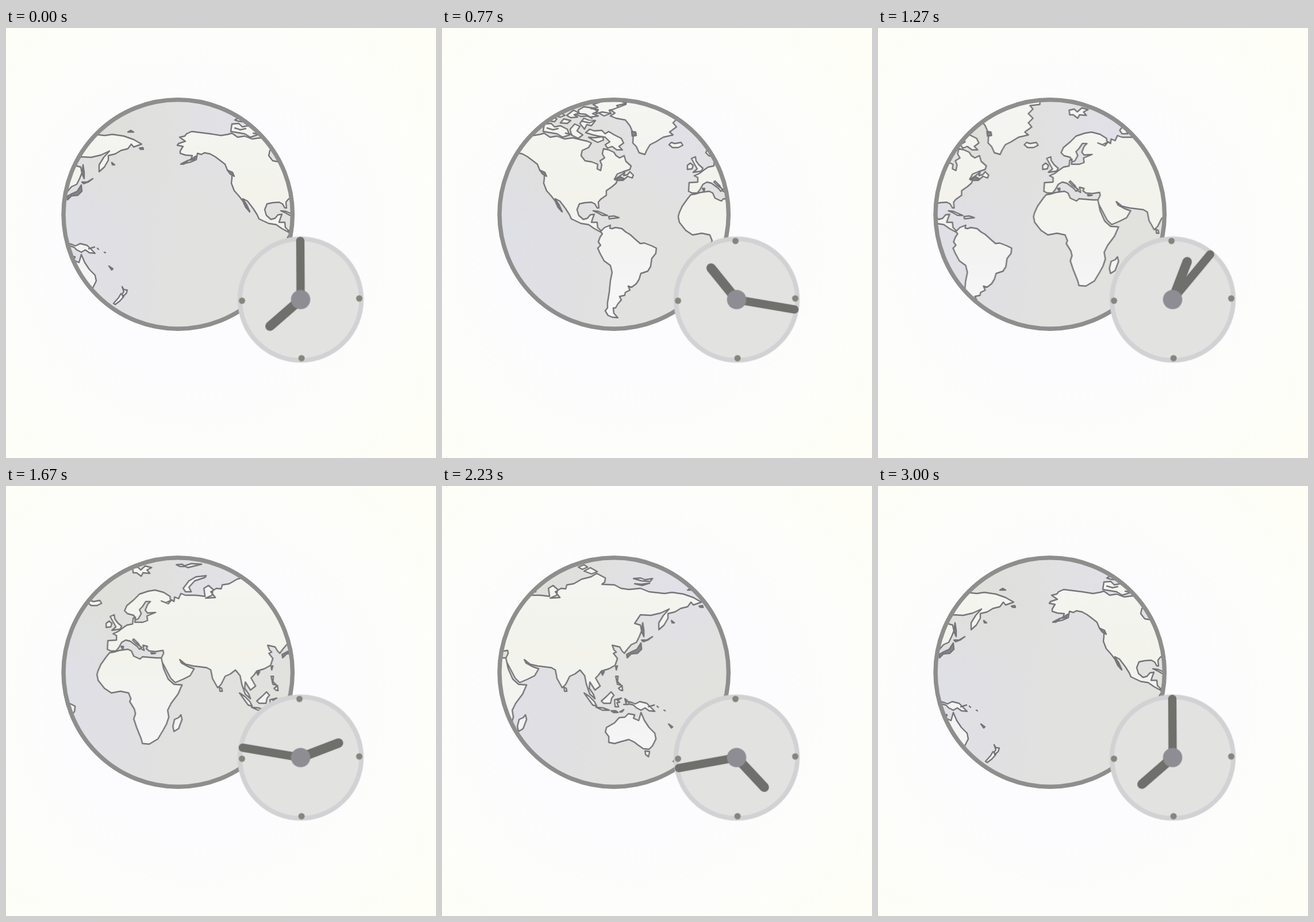
These frames come from a looping animation (748 by 748 pixels, 3.03 s). An HTML page without scripts:

```html
<!DOCTYPE html>
<html lang="en">
<head>
<meta charset="utf-8">
<title>World clock</title>
<style>
html, body { margin: 0; width: 100%; height: 100%; overflow: hidden; background: #fdfdfd; }
svg { display: block; width: 100vw; height: 100vh; }
.coast { fill: url(#land); stroke: #757579; stroke-width: 2.4; stroke-linejoin: round; stroke-linecap: round; }
.seam { stroke: #f3f3ed; stroke-width: 4; }
.dark { fill: #858588; }
.spin { animation: 3030ms steps(90, end) -4ms infinite; }
#world { animation-name: drift; }
#hour { animation-name: hour; }
#minute { animation-name: minute; }
.hand { stroke: #6f706b; stroke-linecap: round; }
@keyframes drift {
  0% { transform: translateX(0); }
  99.0099%, 100% { transform: translateX(-842px); }
}
@keyframes hour {
  0% { transform: rotate(-131deg); }
  99.0099%, 100% { transform: rotate(229deg); }
}
@keyframes minute {
  0% { transform: rotate(-.3deg); }
  99.0099%, 100% { transform: rotate(1799.7deg); }
}
</style>
</head>
<body>
<svg viewBox="0 0 748 748">
<defs>
  <radialGradient id="paper" cx=".45" cy=".5" r=".68">
    <stop offset=".45" stop-color="#fcfcfe"/>
    <stop offset="1" stop-color="#fefef7"/>
  </radialGradient>
  <linearGradient id="sea" x1="0" y1=".55" x2="1" y2=".65">
    <stop offset=".05" stop-color="#dfdfe6"/>
    <stop offset=".5" stop-color="#e1e1e0"/>
    <stop offset="1" stop-color="#e1e2dd"/>
  </linearGradient>
  <radialGradient id="cool" cx=".8" cy=".12" r=".42">
    <stop offset="0" stop-color="#e1e0e8"/>
    <stop offset="1" stop-color="#e1e0e8" stop-opacity="0"/>
  </radialGradient>
  <radialGradient id="warm" cx=".2" cy=".15" r=".4">
    <stop offset="0" stop-color="#dfe0da"/>
    <stop offset="1" stop-color="#dfe0da" stop-opacity="0"/>
  </radialGradient>
  <linearGradient id="land" gradientUnits="userSpaceOnUse" x1="0" y1="130" x2="0" y2="460">
    <stop offset="0" stop-color="#f5f5f2"/>
    <stop offset=".5" stop-color="#f3f3ec"/>
    <stop offset=".8" stop-color="#f3f3f3"/>
    <stop offset="1" stop-color="#f6f6f6"/>
  </linearGradient>
  <clipPath id="disc"><circle cx="299.2" cy="324" r="199"/></clipPath>

  <g id="map" class="coast">
    <!-- North America -->
    <path class="seam" d="M393 262L515 263"/>
    <path d="M393 262L393 254 385 247 381 237 372 230 364 224 355 219 345 217 340 220 333 218 331 229 322 233 304 237 322 228 324 222 312 221 303 218 303 214 308 206 298 204 300 201 312 197 302 190 311 188 314 184 323 180 355 184 374 187 386 185 393 183 403 190 415 188 428 193 443 191 455 194 468 197 475 200 470 208 459 213 457 222 464 231 476 233 486 237 485 245 491 248 493 238 490 231 498 226 494 219 496 210 505 212 514 216 518 222 524 226 532 222 535 232 544 240 542 246 530 250 520 254 515 263"/>
    <path d="M515 263L524 258 533 251 531 257 538 255 542 250 548 256 546 261 538 258 530 265 520 265 518 270 511 276 501 283 501 291 491 298 487 303 488 313 485 313 481 306 475 303 463 304 454 306 450 316 453 326 461 333 468 331 473 325 480 324 477 332 475 338 485 338 486 347 491 352 493 356 480 349 470 342 457 340 440 332 437 325 430 314 420 301 412 297 418 308 424 320 417 312 412 301 405 292 397 283 392 270 393 262"/>
    <path class="dark" d="M385 247l9 4 3 7-7-4zM413 299l6 9 5 11-7-8zM320 230l10-7-2 6zM305 236l12-6-8 7zM516 264l10-5 6 3-8 3z"/>
    <path d="M478 318l9 1 9 4 7 3-9 0-7-4zM505 328l9-1 9 3-9 1-8 1z"/>
    <!-- South America -->
    <path d="M491 354L498 347 508 343 507 348 511 349 517 347 528 349 535 355 542 359 553 369 560 375 567 374 580 379 588 383 587 392 580 401 578 415 573 423 561 427 558 437 553 445 545 451 539 449 542 456 534 460 533 465 524 467 527 473 521 480 517 487 513 487 514 496 521 504 511 503 504 500 499 492 503 487 503 478 506 460 508 440 511 425 508 413 497 405 490 392 486 383 491 378 487 372 490 364 494 358z"/>
    <!-- Arctic islands -->
    <path d="M391 180L393 167 405 166 411 172 421 170 433 176 437 186 425 190 415 184 403 182z"/>
    <path d="M465 182L472 176 480 179 493 178 499 184 505 180 515 186 527 192 531 200 523 206 529 212 519 212 511 206 503 209 499 203 507 198 499 190 487 188 478 186z"/>
    <path d="M398 160l9-5 8 3-4 5-7-1zM412 153l10-5 7 4-8 3zM421 165l6-7 12 3-6 5zM432 152l12-9 10 5-9 3 6 4-12 1zM438 176l8-9 9 4-5 8 10 7-8 6-12-6zM455 166l7-9 10 4 10 0-7 9-8-2-4 8zM470 190l10 1 15-2 1 6-10 4-8-4z"/>
    <path d="M452 143l10-6 14 2 10 6-9 4 10 4-14 2-8-5-11-1zM478 133l17-6 30 0 11 4-17 4 5 5-18 3 3 6-15-3-11 3 4-7-13-2 12-2z"/>
    <path d="M398 174l10 3 9-2M447 150l10 4 11-1 8 4M430 183l11 2M458 162l14 3 9-4M488 148l9 5 10-4"/>
    <!-- Greenland, Iceland -->
    <path d="M540 112L638 112 637 133 620 135 625 141 617 149 625 157 617 165 623 172 611 181 617 186 600 190 587 198 577 203 571 213 568 220 558 217 553 206 547 200 548 184 542 170 534 160 518 157 508 153 516 148 509 143 535 133z"/>
    <path d="M610 203l4-4 6 2 11-2 3 5-8 4-10 0z"/>
    <path class="dark" d="M545 180l7 1 1 6-7 1z"/>
    <!-- Europe and Asia -->
    <path class="seam" d="M798 190L965 272 738 299z"/>
    <path d="M738 299L742 291 741 286 728 288 717 287 712 283 714 279 706 277 708 286 704 284 698 274 690 266 688 268 693 273 704 281 700 284 696 279 684 270 676 268 669 272 664 281 659 287 650 287 644 284 645 269 660 268 660 260 654 257 663 253 668 249 678 242 688 240 689 230 693 228 692 237 706 237 714 234 713 226 728 220 714 221 710 216 714 206 719 201 711 201 705 210 700 215 703 222 698 231 693 233 690 225 679 222 674 217 678 208 690 198 700 188 715 183 727 181 742 185 753 192 754 199 746 203 738 200 750 205 756 198 760 201 761 193 768 196 772 187 780 190 798 190"/>
    <path d="M798 190L814 192 812 178 820 173 828 180 826 190 815 195 832 194 824 184 834 178 842 179 844 172 856 170 870 162 886 158 896 152 911 160 910 167 905 171 927 172 938 178 952 180 972 178 987 184 1014 187 1027 185 1047 188 1064 194 1078 202 1064 207 1060 202 1054 210 1042 213 1032 219 1020 222 1020 230 1013 242 1004 250 1004 238 1012 225 1022 214 1007 221 990 225 972 224 962 239 972 242 974 252 970 262 965 272"/>
    <path d="M965 272L956 276 950 283 944 291 940 287 936 280 923 277 926 285 930 289 925 291 932 300 928 312 917 318 904 322 899 329 894 334 902 348 893 355 884 341 883 352 890 362 893 370 884 362 878 345 875 330 867 320 858 327 849 331 842 345 836 351 827 335 824 320 817 316 793 313 780 310 770 302 773 308 784 314 795 318 788 330 776 336 762 342 754 334 744 315 736 300 738 299"/>
    <path d="M649 227l7-3 1 7 5 7 7 6-3 5-14 2 7-6-4-7zM642 239l5-4 5 4-2 6-8 1z"/>
    <path d="M688 143l9-2 5 5 8-7 11 3-8 4 5 6-12-1-3 6-8-6-6 0zM764 137l10-1 6 4-10 0zM778 139l12-4 18 1-12 3-12 3z"/>
    <path d="M816 156L798 158 786 165 776 178 780 184 790 184 786 176 796 165 814 159z"/>
    <path d="M864 141l10-4 6 4-9 4zM874 148l11-6 12 7-10 4zM960 161l12-1 8 3 13-2-4 5-15-1zM962 170l12 1 14-2-13 4z"/>
    <path class="dark" d="M1054 181l5-3 5 3zM1074 209l6-1 1 3-5 0zM1026 234l5 4-4 0zM668 279l4 0-1 6zM720 290l8 1-7 1z"/>
    <!-- Africa -->
    <path d="M738 299L729 299 717 298 705 297 701 301 690 296 686 287 680 284 665 286 655 289 648 290 643 296 633 310 628 321 626 328 628 338 639 352 651 360 667 357 681 360 685 370 683 375 691 388 693 396 690 405 695 420 703 440 705 448 717 449 732 440 741 425 747 414 751 402 749 390 755 378 767 362 774 346 760 345 750 336 742 318z"/>
    <path d="M772 398L774 406 768 422 760 427 758 418 761 406 768 403z"/>
    <!-- Pacific rim -->
    <path d="M839 350l4 2 1 5-4 0z"/>
    <path class="dark" d="M976 238l2 13 0 11-4-9zM974 268l9 0 10-6-8 6-8 3zM973 273l1 11-7 7-11 1-7 7-1-6 9-5 9-4zM929 314l3-1-2 7zM904 324l5-1-3 6z"/>
    <path d="M929 331l4 0-1 9 6 6-6-1zM934 352l6-5 1 9-4-1z"/>
    <path d="M874 360l9 6 9 9 4 8-7-2-8-11zM895 385l12 1 11 4-12 0zM904 374l9-8 8-8 5 6-4 5-2 9-12 0zM927 372l12-3-7 4 4 3-5 1 3 7-6 0z"/>
    <path class="dark" d="M921 391l8 0 4 3-8 0zM936 393l7-4-3 4zM945 370l4 3-2 5zM943 380l8 0"/>
    <path d="M951 375l7 2 5 2 8-4 12 3 7 7 7 7-10-1-7-5-7 4-8-4-5-5-8-2z"/>
    <path class="dark" d="M986 384l10-3M1001 383l2 2M1013 390l2 1M1021 414l7 5-2 2z"/>
    <path d="M913 420L927 412 935 403 945 402 951 396 962 398 960 404 969 408 973 394 979 408 987 420 997 430 999 440 993 452 987 458 977 457 967 450 962 446 952 441 937 445 927 448 917 446 917 436 911 428z"/>
    <path d="M980 461l8 1-2 9-5-4z"/>
    <path d="M202 450l3 5 6 1-2 6-6 5-1-4 3-4zM200 462l5 5-7 8-8 6-3-2 9-10z"/>
  </g>
</defs>

<rect width="748" height="748" fill="url(#paper)"/>

<g clip-path="url(#disc)">
  <g fill="url(#sea)"><circle cx="299.2" cy="324" r="200"/></g>
  <circle cx="299.2" cy="324" r="200" fill="url(#cool)"/>
  <circle cx="299.2" cy="324" r="200" fill="url(#warm)"/>
  <g id="world" class="spin">
    <use href="#map" x="-842"/>
    <use href="#map"/>
    <use href="#map" x="842"/>
  </g>
</g>
<circle cx="299.2" cy="324" r="199.2" fill="none" stroke="#8e8e8d" stroke-width="7.4"/>

<g transform="translate(512.5 472.4)">
  <circle r="105.7" fill="#e2e2e1" stroke="#d2d2d5" stroke-width="8"/>
  <g fill="#85857d">
    <circle cx="-2" cy="-102" r="5.5"/>
    <circle cx="102" cy="-2" r="5.5"/>
    <circle cx="1.6" cy="102" r="5.5"/>
    <circle cx="-102" cy="2" r="5.5"/>
  </g>
  <g id="hour" class="spin"><path class="hand" stroke-width="16.5" d="M0 0V-70.5"/></g>
  <g id="minute" class="spin"><path class="hand" stroke-width="14.5" d="M0 0V-102"/></g>
  <circle r="16.8" fill="#8e8d94"/>
</g>
</svg>
</body>
</html>
```
